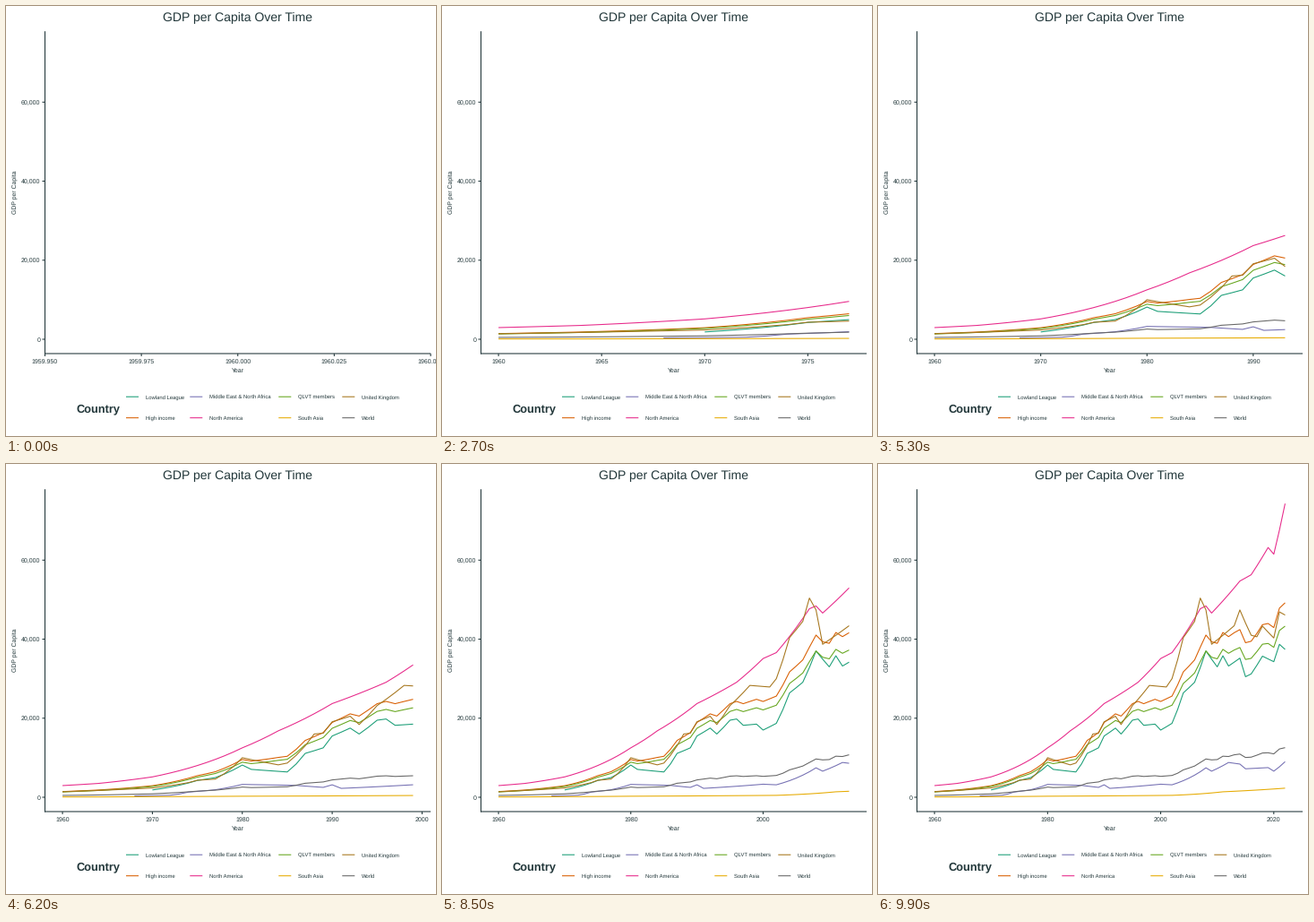
Write a matplotlib script that moves like this. It is 480 by 480 pixels and loops after 10000 ms.

```python
import math

import matplotlib
import matplotlib.pyplot as plt
import numpy as np
from matplotlib.animation import FuncAnimation
from matplotlib.collections import LineCollection

matplotlib.rcParams.update({
    "font.family": "Liberation Sans",
    "text.hinting": "none",
    "path.snap": False,
    "path.simplify": False,
})

SIZE, DPI = 480, 80
PX = 72 / DPI
FRAMES, INTERVAL = 100, 100
LEFT, RIGHT, TOP, BOTTOM = 43.5, 474.0, 28.2, 388.0
ZERO, PER_THOUSAND = 372.0, 264.7 / 60
INK = "#22373A"
LINE_W = 1.07 * PX
YEARS = np.arange(1960, 2023)


def growth(keys):
    """Constant growth rate between a few key years."""
    return np.exp(np.interp(YEARS, list(keys), np.log(list(keys.values()))))


def bump(year, width, height):
    return height * np.exp(-((YEARS - year) / width) ** 2)


# Incomes in thousand dollars, turning points only
america = growth({
    1960: 2.95, 1964: 3.5, 1970: 5.15, 1980: 12.5, 1984: 16.8, 1990: 23.7,
    1996: 29.1, 2000: 35.1, 2002: 36.6, 2007: 47.7, 2008: 48.4, 2009: 46.6,
    2014: 54.7, 2016: 56.3, 2019: 63.2, 2020: 61.5, 2022: 74.3})
league = growth({
    1960: 0.7, 1970: 1.85, 1975: 4.25, 1977: 4.97, 1980: 8.15, 1981: 7.05,
    1985: 6.4, 1987: 11.1, 1989: 12.5, 1990: 15.5, 1992: 17.5, 1993: 16,
    1995: 19.5, 1996: 19.8, 1997: 18.2, 1999: 18.5, 2000: 17, 2002: 18.7,
    2004: 26.4, 2006: 29.1, 2008: 37, 2010: 33, 2011: 35.8, 2012: 33.2,
    2014: 35.2, 2015: 30.5, 2016: 31.2, 2018: 35.7, 2020: 34.3, 2021: 38.7,
    2022: 37.4})
kingdom = growth({
    1960: 1.4, 1970: 2.35, 1974: 3.7, 1975: 4.3, 1977: 4.6, 1980: 10,
    1984: 8.2, 1985: 8.65, 1988: 16, 1989: 16.2, 1990: 19.1, 1992: 20.5,
    1993: 18.4, 1995: 23.2, 1998: 28.3, 2001: 27.9, 2002: 30, 2004: 40.4,
    2006: 44.5, 2007: 50.4, 2008: 47.4, 2009: 38.7, 2013: 43.4, 2014: 47.4,
    2016: 41, 2017: 40.6, 2018: 43.3, 2020: 40.3, 2021: 46.9, 2022: 46.1})
mideast = growth({
    1968: 0.33, 1972: 0.52, 1974: 1.3, 1977: 1.9, 1980: 3.25, 1986: 3,
    1989: 2.5, 1990: 3.15, 1991: 2.25, 2000: 3.3, 2002: 3.15, 2008: 7.45,
    2009: 6.6, 2012: 8.8, 2014: 8.4, 2015: 7.2, 2019: 7.5, 2020: 6.6,
    2022: 9})
asia = growth({1960: 0.08, 1980: 0.26, 2002: 0.48, 2011: 1.38, 2022: 2.3})

# The broad groups follow from the regions above
age = (YEARS - YEARS[0]) / (YEARS[-1] - YEARS[0])
rich = 0.33 * america + 0.66 * league + bump(1997, 9, 1.6) + bump(2012, 3, 1.7)
members = rich * (0.935 - 0.055 * age ** 2)
world = rich * np.interp(YEARS, [1960, 1985, 1990, 2003, 2013, 2022],
                         [0.324, 0.256, 0.232, 0.214, 0.258, 0.255])

# Name, colour, first year, values
SERIES = [
    ("Lowland League", "#1B9E77", 1970, league),
    ("High income", "#D95F02", 1960, rich),
    ("Middle East & North Africa", "#7570B3", 1968, mideast),
    ("North America", "#E7298A", 1960, america),
    ("QLVT members", "#66A61E", 1960, members),
    ("South Asia", "#E6AB02", 1960, asia),
    ("United Kingdom", "#A6761D", 1960, kingdom),
    ("World", "#666666", 1960, world),
]

fig = plt.figure(figsize=(SIZE / DPI, SIZE / DPI), dpi=DPI, facecolor="white")
ax = fig.add_axes([0, 0, 1, 1])
ax.set_xlim(0, SIZE)
ax.set_ylim(SIZE, 0)
ax.axis("off")


def label(x, y, text, size, **kw):
    kw = {"ha": "left", "va": "baseline", "color": INK, **kw}
    return ax.text(x, y, text, fontsize=size * PX, **kw)


def stroke(xs, ys, color=INK, **kw):
    line, = ax.plot(xs, ys, color=color, lw=LINE_W, solid_capstyle="butt",
                    solid_joinstyle="round", **kw)
    return line


# Title and axes
MID = (LEFT + RIGHT) / 2
label(MID - 0.2, 16.7, "GDP per Capita Over Time", 14, ha="center")
label(MID, 408.5, "Year", 6.9, ha="center")
label(11.5, 207.7, "GDP per Capita", 6.9, ha="center", rotation=90,
      rotation_mode="anchor")
stroke([LEFT, LEFT], [TOP, BOTTOM + 0.5], zorder=3)
stroke([LEFT - 0.5, RIGHT], [BOTTOM, BOTTOM], zorder=3)
for thousands in range(0, 61, 20):
    y = ZERO - thousands * PER_THOUSAND
    stroke([LEFT - 3, LEFT], [y, y], zorder=3)
    label(38.3, y + 2.5, f"{thousands * 1000:,}", 7, ha="right")

# Legend, filled column by column
label(78, 452.8, "Country", 12.7, weight="bold")
COLUMNS, ROWS = (134, 205.3, 304.3, 375.3), (436.2, 459.7)
for n, (name, color, *_) in enumerate(SERIES):
    x, y = COLUMNS[n // 2], ROWS[n % 2]
    stroke([x, x + 14], [y, y], color)
    label(x + 21.5, y + 2.1, name, 5.9)

# Moving parts
lines = [stroke([], [], color) for _, color, *_ in SERIES]
ticks = LineCollection([], colors=INK, linewidths=LINE_W, zorder=3)
ax.add_collection(ticks)
tick_labels = [label(0, 398.5, "", 7, ha="center") for _ in range(12)]


def nice_breaks(lo, hi, target=5):
    """Extended Wilkinson tick search, limited to breaks inside lo..hi."""
    best, found = -math.inf, ()
    span, eps = hi - lo, 1e-6
    for j in (1, 2, 3):
        for i, q in enumerate((1, 5, 2, 2.5, 4, 3)):
            simple = 1 - i / 5 - j
            for k in range(2, 13):
                z = math.ceil(math.log10(span / (k + 1) / (j * q)))
                for step in (j * q * 10.0 ** z, j * q * 10.0 ** (z + 1)):
                    start = (math.floor(hi / step + eps) - k + 1) * j
                    stop = math.ceil(lo / step - eps) * j
                    for s in range(start, stop + 1):
                        a = s * step / j
                        b = a + step * (k - 1)
                        cover = 1 - 50 * ((hi - b)**2 + (lo - a)**2) / span**2
                        ratio = ((k - 1) / (b - a)
                                 * (max(b, hi) - min(a, lo)) / (target - 1))
                        density = 2 - max(ratio, 1 / ratio)
                        score = 0.25 * simple + 0.2 * cover + 0.5 * density
                        if score > best + 1e-9:
                            best, found = score, (a, step, k)
    a, step, k = found
    marks = [a + step * n for n in range(k)]
    return [m for m in marks if lo - eps <= m <= hi + eps]


def decimals(values):
    for d in range(3):
        if all(abs(round(v, d) - v) < 5e-4 for v in values):
            return d
    return 3


# Each year lands on a whole frame; the head glides between them
year_frames = np.round(age * (FRAMES - 1))


def draw(i):
    head = np.interp(i, year_frames, YEARS)
    pad = 0.05 * (head - YEARS[0]) or 0.05
    lo, hi = YEARS[0] - pad, head + pad

    def to_x(year):
        return LEFT + (RIGHT - LEFT) * (year - lo) / (hi - lo)

    for line, (_, _, first, values) in zip(lines, SERIES):
        past = YEARS[(YEARS >= first) & (YEARS < head)]
        xs = np.append(past, head) if past.size else past
        ys = np.interp(xs, YEARS, values)
        line.set_data(to_x(xs), ZERO - ys * PER_THOUSAND)

    marks = nice_breaks(lo, hi)
    digits = decimals(marks)
    ticks.set_segments([[(to_x(m), BOTTOM), (to_x(m), BOTTOM + 3)]
                        for m in marks])
    for text in tick_labels:
        text.set_text("")
    for text, mark in zip(tick_labels, marks):
        text.set_x(to_x(mark))
        text.set_text(f"{mark:.{digits}f}")
    return []


anim = FuncAnimation(fig, draw, frames=FRAMES, interval=INTERVAL,
                     repeat=True, repeat_delay=0, blit=False)
plt.show()
```
